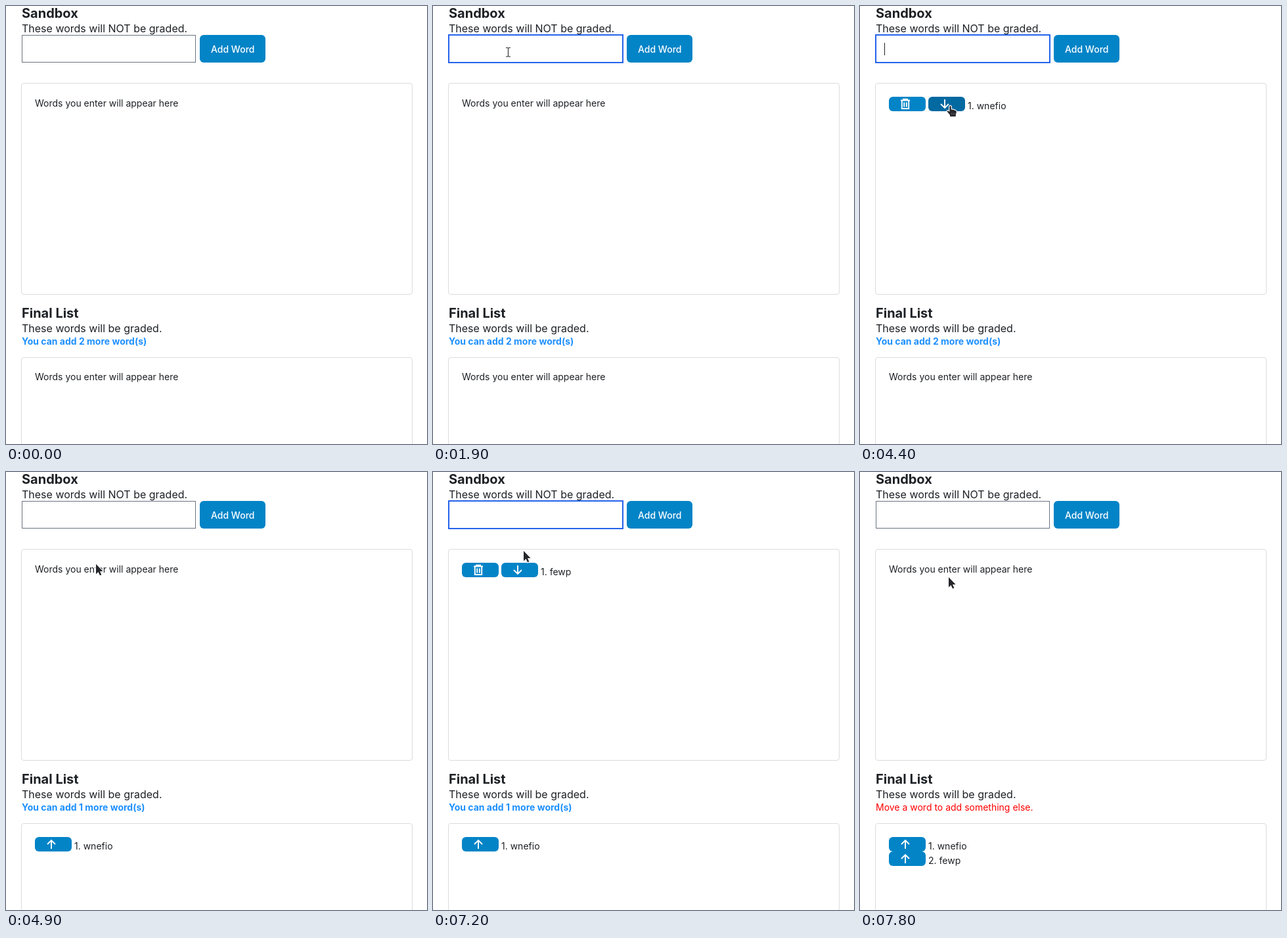
Write an HTML page that moves like this. It is 641x666 px and loops after 8000 ms.

```html
<!DOCTYPE html>
<html lang="en">
<head>
<meta charset="utf-8">
<title>Word list</title>
<style>
  html, body { margin: 0; width: 100%; height: 100%; overflow: hidden; background: #fff; }
  svg { display: block; }
  text { font: 14px Inter, sans-serif; fill: #1d2125; white-space: pre; }
  .title { font-size: 20px; font-weight: 700; }
  .note, #typed { font-size: 16px; }
  .add { font-weight: 500; fill: #fff; }
  .panel { fill: #fff; stroke: #dcdcdc; }
  .button { fill: #0284c7; }
  .hover .button { fill: #0369a1; }
  .icon { fill: none; stroke: #fff; stroke-width: 1.9; }
  .outline { fill: #fff; stroke: #fff; stroke-width: 2.4; stroke-linejoin: round; }
  .ink { fill: #26272b; }
</style>
</head>
<body>
<svg width="641" height="666" viewBox="0 0 641 666">
  <defs>
    <rect id="pill" class="button" width="56" height="22" rx="6"/>
    <path id="arrow" class="icon" d="M0-7V6M-6 0L0 6L6 0"/>
    <path id="trash" class="icon" stroke-width="1.6" d="M-7-5.5H7M-3-6V-7.2H3V-6M-5.2-5V7H5.2V-5M-1.8-2.5V4.5M1.8-2.5V4.5"/>
    <path id="beamShape" d="M-3.5-6.5H-1L0-5.8L1-6.5H3.5M0-5.8V6.3M-3.5 7H-1L0 6.3L1 7H3.5"/>
    <path id="pointerShape" d="M0 0V15.2L3.5 12L6 17.3L8.4 16.2L6 11H10.6Z"/>
    <path id="handShape" d="M-1.2 0.8Q0-.8 1.2 .8V5.2L3 5.5L5.5 6L8 7Q9.5 7.6 9.3 9.5L8.3 13V16H-.5V13.8L-4.8 8.6Q-5 6.8-3.3 7.3L-1.2 9Z"/>
  </defs>

  <text class="title" x="24" y="18">Sandbox</text>
  <text class="note" x="24" y="40">These words will NOT be graded.</text>
  <rect id="field" fill="#fff"/>
  <text id="typed" x="37" y="71"></text>
  <rect id="caret" y="56" width="1" height="19" fill="#1d2125"/>
  <rect class="button" x="295" y="44" width="100" height="42" rx="6"/>
  <text class="add" x="312" y="71">Add Word</text>

  <rect class="panel" x="23.5" y="117.5" width="595" height="321" rx="3.5"/>
  <text id="sandboxEmpty" x="44" y="153">Words you enter will appear here</text>
  <g id="sandboxItem">
    <use href="#pill" x="44" y="138"/>
    <use href="#trash" x="69" y="149"/>
    <g id="moveDown">
      <rect class="button" x="104" y="138" width="56" height="22" rx="6"/>
      <use href="#arrow" x="129" y="149"/>
    </g>
    <text id="sandboxWord" x="164" y="157"></text>
  </g>

  <text class="title" x="24" y="474">Final List</text>
  <text class="note" x="24" y="496">These words will be graded.</text>
  <text id="status" x="24" y="515"></text>
  <rect class="panel" x="23.5" y="534.5" width="595" height="321" rx="3.5"/>
  <text id="finalEmpty" x="44" y="569">Words you enter will appear here</text>
  <g id="final1">
    <use href="#pill" x="44" y="555"/>
    <use href="#arrow" transform="translate(69 566) scale(1 -1)"/>
    <text x="104" y="574">1. wnefio</text>
  </g>
  <g id="final2">
    <use href="#pill" x="44" y="577"/>
    <use href="#arrow" transform="translate(69 588) scale(1 -1)"/>
    <text x="104" y="596">2. fewp</text>
  </g>

  <g id="cursor">
    <g id="beam" fill="none">
      <use href="#beamShape" stroke="#fff" stroke-width="3"/>
      <use href="#beamShape" stroke="#333" stroke-width="1.2"/>
    </g>
    <g id="pointer">
      <use href="#pointerShape" class="outline"/>
      <use href="#pointerShape" class="ink"/>
    </g>
    <g id="hand">
      <use href="#handShape" class="outline"/>
      <use href="#handShape" class="ink"/>
      <path d="M2 10.5V13.5M4.3 10.5V13.5M6.5 10.5V13.5" stroke="#777" stroke-width=".7"/>
    </g>
  </g>
</svg>
<script>
const LOOP = 8000, TICK = 100;
const $ = id => document.getElementById(id);
const show = (id, on) => $(id).style.display = on ? '' : 'none';
const within = (t, ...spans) => spans.some(([from, to]) => t >= from && t < to);

// Pointer hotspot: [time, x, y]
const path = [
  [200, 169, 26], [300, 151, 41], [400, 133, 56], [500, 120, 67], [600, 114.5, 70],
  [3800, 114.5, 70], [3900, 116, 75], [4200, 131, 125], [4300, 136, 144], [4400, 137.5, 152],
  [4500, 138, 152], [4600, 137, 140],
  [5100, 137, 140], [5200, 136, 136], [5500, 122, 84], [5600, 119, 74], [5700, 118.5, 72],
  [6900, 118.5, 72], [7000, 120, 77], [7200, 138, 120], [7300, 140, 138], [7400, 139, 149],
  [7500, 137, 154], [7700, 136, 158], [7800, 135, 160]
];

// Text in the field: [time, text]
const typing = [
  [0, ''], [2400, 'wnefi'], [2600, 'wnefio'], [3100, ''],
  [6000, 'f'], [6100, 'fe'], [6200, 'few'], [6300, 'fewp'], [6600, '']
];

function pointerAt(t) {
  const next = path.findIndex(key => key[0] > t);
  if (next < 0) return path.at(-1).slice(1);
  if (next === 0) return path[0].slice(1);
  const [t0, x0, y0] = path[next - 1], [t1, x1, y1] = path[next];
  const k = (t - t0) / (t1 - t0);
  return [x0 + (x1 - x0) * k, y0 + (y1 - y0) * k];
}

function drawField(t) {
  const focused = within(t, [800, 4800], [5800, 7600]);
  const box = focused
    ? { x: 24, y: 44, width: 265, height: 42, stroke: '#2563eb', 'stroke-width': 2 }
    : { x: 24.5, y: 44.5, width: 264, height: 41, stroke: '#6b7280', 'stroke-width': 1 };
  for (const name in box) $('field').setAttribute(name, box[name]);
  $('typed').textContent = typing.findLast(key => key[0] <= t)[1];
  $('caret').setAttribute('x', 37 + Math.round($('typed').getComputedTextLength()));
  show('caret', within(t, [800, 1900], [2400, 3900], [4400, 4800], [5800, 7000]));
}

function drawLists(t) {
  const first = within(t, [3100, 4900]), second = within(t, [6600, 7700]);
  const moved = (t >= 4900) + (t >= 7700);
  show('sandboxEmpty', !first && !second);
  show('sandboxItem', first || second);
  $('sandboxWord').textContent = first ? '1. wnefio' : '1. fewp';
  show('finalEmpty', moved === 0);
  show('final1', moved > 0);
  show('final2', moved > 1);
  const full = moved === 2;
  $('status').textContent = full
    ? 'Move a word to add something else.'
    : `You can add ${2 - moved} more word(s)`;
  $('status').style.fill = full ? '#f00' : '#1e90ff';
  $('status').style.fontWeight = full ? 400 : 700;
  return first || second;
}

function drawCursor(t, hasItem) {
  const [x, y] = pointerAt(t);
  const overField = x > 24 && x < 289 && y > 44 && y < 86;
  const overMove = hasItem && x > 104 && x < 160 && y >= 138 && y < 160;
  show('cursor', t >= 200);
  $('cursor').setAttribute('transform', `translate(${x} ${y})`);
  show('beam', overField);
  show('hand', overMove);
  show('pointer', !overField && !overMove);
  $('moveDown').classList.toggle('hover', overMove);
}

function draw() {
  const t = Math.floor(performance.now() % LOOP / TICK) * TICK;
  drawField(t);
  drawCursor(t, drawLists(t));
  requestAnimationFrame(draw);
}
draw();
</script>
</body>
</html>
```
